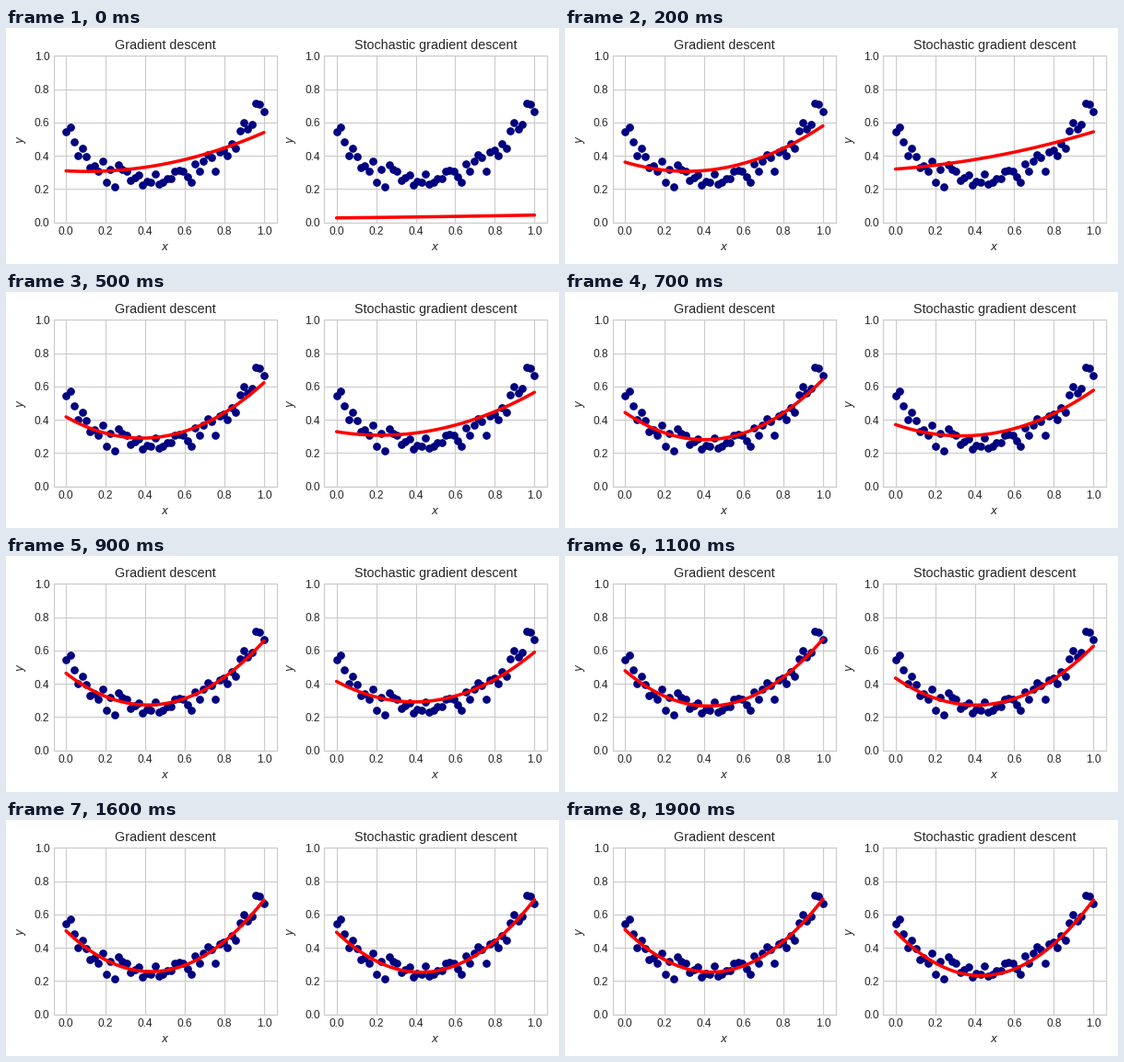
These frames come from a looping animation (600x257 px, 2000 ms). A matplotlib script:

```python
import numpy as np
import matplotlib.pyplot as plt
from matplotlib.animation import FuncAnimation

W, H, DPI = 600, 257, 64
FRAMES, INTERVAL = 20, 100
INK, GRID = "0.15", "0.8"


def px(n):
    """Convert pixels to points."""
    return n * 72 / DPI


plt.rcParams.update({
    "font.family": "Liberation Sans",
    "text.color": INK,
    "axes.labelcolor": INK,
    "axes.edgecolor": GRID,
    "axes.linewidth": px(1.19),
    "axes.axisbelow": True,
    "grid.color": GRID,
    "grid.linewidth": px(1.19),
})

# Noisy samples on an even grid over [0, 1]
y_data = np.array([
    .544, .572, .481, .403, .445, .395, .331, .340, .309, .370,
    .243, .320, .213, .345, .318, .309, .254, .268, .287, .226,
    .246, .243, .290, .232, .240, .260, .265, .304, .312, .307,
    .271, .238, .351, .309, .365, .406, .392, .304, .423, .436,
    .400, .472, .447, .550, .602, .560, .588, .715, .710, .663])
x_data = np.linspace(0, 1, len(y_data))
x_fit = np.linspace(0, 1, 100)

# Quadratic coefficients (c, b, a): full descent decays to its optimum
START = np.array([.309, -.063, .294])
OPTIMUM = np.array([.525, -1.27, 1.45])
DECAY = .87

# The stochastic fit wanders between these states: step, c, b, a
WALK = np.array([
    [0, .026, .012, .005],
    [1, .270, .080, .100],
    [2, .320, .088, .136],
    [5, .328, -.190, .427],
    [9, .414, -.630, .806],
    [13, .454, -.980, 1.189],
    [16, .493, -1.130, 1.327],
    [19, .497, -1.225, 1.416]])


def full_coefs(i):
    return OPTIMUM + (START - OPTIMUM) * DECAY ** i


def stochastic_coefs(i):
    return [np.interp(i, WALK[:, 0], col) for col in WALK.T[1:]]


def curve(coefs):
    c, b, a = coefs
    return c + b * x_fit + a * x_fit ** 2


def make_panel(left, title):
    top, bottom, width = 30.5, 211.5, 242
    ax = fig.add_axes([left / W, 1 - bottom / H, width / W, (bottom - top) / H])
    ax.set_xlim(-.0635, 1.0635)
    ax.set_ylim(0, 1)
    ticks = np.linspace(0, 1, 6)
    ax.set_xticks(ticks)
    ax.set_yticks(ticks)
    ax.grid(True)
    ax.tick_params(length=0, pad=px(4.2), labelsize=px(11.9), labelcolor=INK)
    ax.set_title(title, fontsize=px(14.29), pad=px(7.1))
    ax.set_xlabel("$x$", fontsize=px(11.9), labelpad=px(4.8))
    ax.set_ylabel("$y$", fontsize=px(11.9), labelpad=px(7))
    ax.scatter(x_data, y_data, s=px(8.7) ** 2, color="navy", linewidths=0, zorder=2)
    line, = ax.plot([], [], color="red", lw=px(3.57),
                    solid_capstyle="round", zorder=3)
    return line


fig = plt.figure(figsize=(W / DPI, H / DPI), dpi=DPI, facecolor="white")
panels = [
    (make_panel(51.5, "Gradient descent"), full_coefs),
    (make_panel(345, "Stochastic gradient descent"), stochastic_coefs),
]


def update(i):
    for line, coefs in panels:
        line.set_data(x_fit, curve(coefs(i)))
    return [line for line, _ in panels]


anim = FuncAnimation(fig, update, frames=FRAMES, interval=INTERVAL,
                     repeat=True, repeat_delay=0)
plt.show()
```
